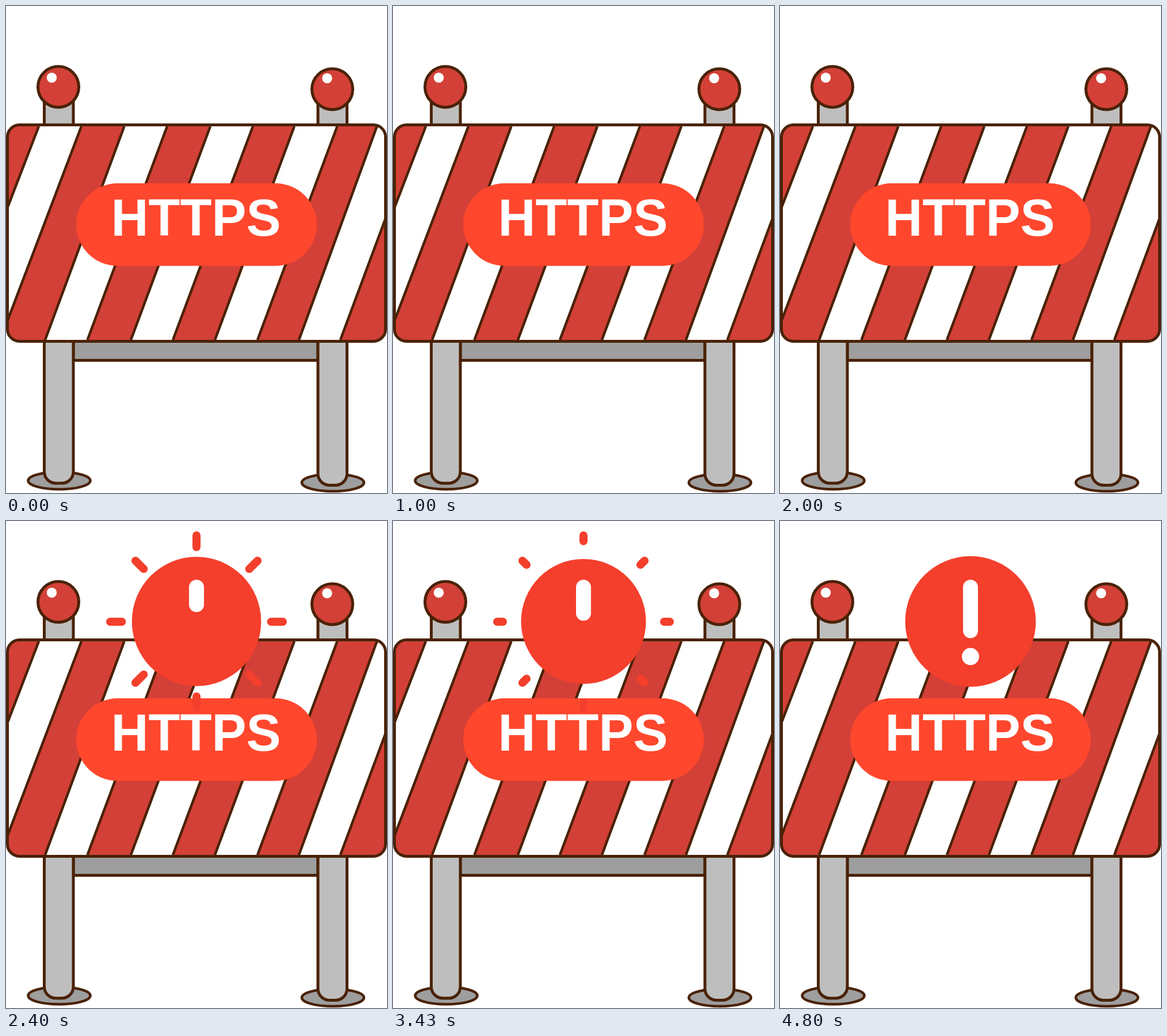
An HTML page with a canvas for the animation above (5010 ms loop, 662 by 846 pixels).

```html
<!DOCTYPE html>
<html lang="en">
<head>
<meta charset="utf-8">
<title>HTTPS barrier</title>
<style>
  html, body { margin: 0; width: 100%; height: 100%; overflow: hidden; background: #fff; }
  canvas { display: block; }
</style>
</head>
<body>
<canvas id="stage" width="662" height="846"></canvas>
<script>
const ctx = document.getElementById('stage').getContext('2d');
const LOOP = 5010;
const INK = '#4a2207', RED = '#d34037', LIGHT = '#bebebe', DARK = '#9e9e9e';
const PILL = '#ff472d', ALERT = '#f43f2c';
const CX = 331, CY = 174.5;

const stripeTop = [57, 131, 205.5, 280, 355, 429, 501, 575.5, 644.5, 719];
const stripeBottom = [-86, -10, 68, 141.5, 217, 290, 363, 437, 509, 581];

function paint(fill, line) {
  ctx.fillStyle = fill;
  ctx.fill();
  if (line) {
    ctx.strokeStyle = INK;
    ctx.lineWidth = line;
    ctx.stroke();
  }
}

function disc(x, y, r, fill, line) {
  ctx.beginPath();
  ctx.arc(x, y, r, 0, Math.PI * 2);
  paint(fill, line);
}

function box(x, y, w, h, r, fill, line) {
  ctx.beginPath();
  ctx.roundRect(x, y, w, h, r);
  paint(fill, line);
}

function post(x, lampX, lampY, shineX, shineY, baseY) {
  ctx.beginPath();
  ctx.ellipse(x + 26, baseY, 54, 15, 0, 0, Math.PI * 2);
  paint(DARK, 4.5);
  box(x, 150, 50.5, baseY + 4.5 - 150, [0, 0, 20, 20], LIGHT, 5);
  disc(lampX, lampY, 35.5, RED, 5);
  disc(shineX, shineY, 8.7, '#fff');
}

function board() {
  ctx.save();
  ctx.beginPath();
  ctx.roundRect(2.5, 206.5, 657, 376, 21);
  ctx.clip();
  ctx.fillStyle = RED;
  ctx.fillRect(0, 200, 662, 390);
  ctx.fillStyle = '#fff';
  for (let i = 0; i < stripeTop.length; i += 2) {
    ctx.beginPath();
    ctx.moveTo(stripeTop[i], 209);
    ctx.lineTo(stripeTop[i + 1], 209);
    ctx.lineTo(stripeBottom[i + 1], 580);
    ctx.lineTo(stripeBottom[i], 580);
    ctx.fill();
  }
  ctx.strokeStyle = INK;
  ctx.lineWidth = 4.5;
  stripeTop.forEach((x, i) => {
    ctx.beginPath();
    ctx.moveTo(x, 209);
    ctx.lineTo(stripeBottom[i], 580);
    ctx.stroke();
  });
  ctx.restore();
  ctx.beginPath();
  ctx.roundRect(2.5, 206.5, 657, 376, 21);
  ctx.lineWidth = 5;
  ctx.stroke();
}

function barrier() {
  box(117, 570, 425, 45.5, 0, DARK, 5);
  post(66.5, 91, 140.5, 79.5, 124.5, 824.5);
  post(542, 567, 144.5, 558, 125.5, 828);
  board();
  box(122, 308, 418, 143.5, 71.75, PILL);
  ctx.fillStyle = '#fff';
  ctx.font = 'bold 90px "Liberation Sans", Arial, sans-serif';
  ctx.fillText('HTTPS', 182.5, 399);
}

const clamp = p => Math.min(1, Math.max(0, p));
const span = (t, a, b) => clamp((t - a) / (b - a));
const smooth = p => p * p * (3 - 2 * p);
const mix = (a, b, p) => a + (b - a) * p;

function radius(t) {
  if (t < 200) return 145 * Math.sin(span(t, 0, 200) * Math.PI / 2);
  if (t < 450) return mix(145, 108.5, smooth(span(t, 200, 450)));
  return mix(108.5, 113.5, smooth(span(t, 450, 600)));
}

function rays(t) {
  if (t < 300 || t >= 650) return;
  const tip = mix(108, 150, smooth(span(t, 250, 400)));
  const tail = t < 550 ? mix(100, 140, smooth(span(t, 300, 450)))
                       : mix(140, 150, span(t, 550, 650));
  ctx.strokeStyle = ALERT;
  ctx.lineWidth = 14;
  ctx.lineCap = 'round';
  for (let i = 0; i < 8; i++) {
    const a = i * Math.PI / 4, c = Math.cos(a), s = Math.sin(a);
    ctx.beginPath();
    ctx.moveTo(CX + c * tail, CY + 0.5 + s * tail);
    ctx.lineTo(CX + c * tip, CY + 0.5 + s * tip);
    ctx.stroke();
  }
  ctx.lineCap = 'butt';
}

function alertSign(t) {
  if (t <= 0) return;
  rays(t);
  disc(CX, CY, radius(t), ALERT);
  const grow = span(t, 300, 550);
  if (grow > 0) box(318, 102, 26, mix(26, 101.5, grow), 13, '#fff');
  const dot = smooth(span(t, 550, 800));
  if (dot > 0) disc(CX, 235.5, 15 * dot, '#fff');
}

// The sign moves in 50 ms poses, shown alternately for 30 and 70 ms.
function poseTime(ms) {
  const t = ms >= 5000 ? 1000 : ms % 1000;
  return Math.min(800, Math.floor(t / 100) * 100 + (t % 100 >= 30 ? 50 : 0));
}

const start = performance.now();
function frame(now) {
  const ms = Math.max(0, now - start) % LOOP;
  ctx.fillStyle = '#fff';
  ctx.fillRect(0, 0, 662, 846);
  barrier();
  alertSign(poseTime(ms));
  requestAnimationFrame(frame);
}
frame(start);
</script>
</body>
</html>
```
